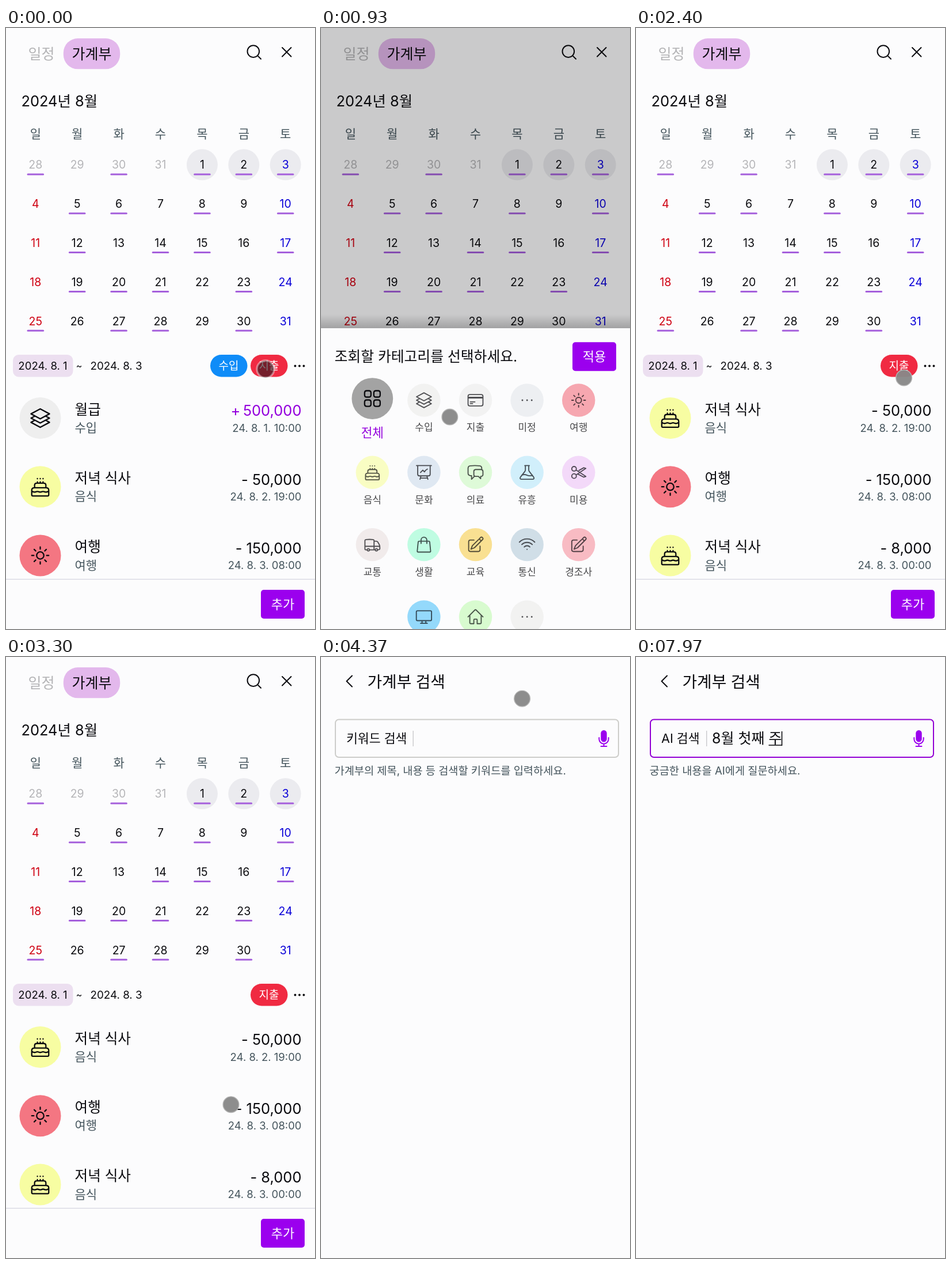
An HTML page for the animation above (8 s loop, 537x1043 px).

```html
<!DOCTYPE html>
<html lang="ko">
<head>
<meta charset="utf-8">
<title>가계부</title>
<style>
html, body { margin: 0; width: 100%; height: 100%; overflow: hidden; background: #fdfdfe; }
svg { display: block; width: 100vw; height: 100vh; }
text { font-family: Inter, "Noto Sans CJK KR", "Noto Sans CJK", "Noto Sans CJK JP", sans-serif; white-space: pre; }
.line { fill: none; stroke-linecap: round; stroke-linejoin: round; }
</style>
</head>
<body>
<svg id="stage" viewBox="0 0 537 1043"></svg>
<script>
const LOOP = 8000;
const PURPLE = '#9b00ee', INK = '#0b0b0f', SLATE = '#44545c', PAPER = '#fcfcfd';

// Icons on a 24-unit grid
const ICONS = {
  grid: 'M6 3.8H8.2Q10.5 3.8 10.5 6V8.2Q10.5 10.5 8.2 10.5H6Q3.8 10.5 3.8 8.2V6Q3.8 3.8 6 3.8ZM15.8 3.8H18Q20.2 3.8 20.2 6V8.2Q20.2 10.5 18 10.5H15.8Q13.5 10.5 13.5 8.2V6Q13.5 3.8 15.8 3.8ZM6 13.5H8.2Q10.5 13.5 10.5 15.8V18Q10.5 20.2 8.2 20.2H6Q3.8 20.2 3.8 18V15.8Q3.8 13.5 6 13.5ZM15.8 13.5H18Q20.2 13.5 20.2 15.8V18Q20.2 20.2 18 20.2H15.8Q13.5 20.2 13.5 18V15.8Q13.5 13.5 15.8 13.5Z',
  layers: 'M12 2.2L21.8 7.5 12 12.8 2.2 7.5ZM6.4 9.8L2.2 12 12 17.2 21.8 12 17.6 9.8M6.4 14.2L2.2 16.5 12 21.8 21.8 16.5 17.6 14.2',
  card: 'M4.5 4.5H19.5Q21.8 4.5 21.8 6.8V17.2Q21.8 19.5 19.5 19.5H4.5Q2.2 19.5 2.2 17.2V6.8Q2.2 4.5 4.5 4.5ZM2.2 8.2H21.8M2.2 9H21.8M5.2 14.2H11.2M5.2 16.5H8.2',
  dots: 'M5.8 12h.1M12 12h.1M18.1 12h.1',
  sun: 'M15.8 12a3.8 3.8 0 1 1-7.6 0 3.8 3.8 0 1 1 7.6 0M12 3v2.2M12 18.8V21M3 12H5.2M18.8 12H21M5.6 5.6L7.2 7.2M16.8 16.8L18.4 18.4M5.6 18.4L7.2 16.8M16.8 7.2L18.4 5.6',
  cake: 'M12 8.2V6.8M9 8.2V6.8M15 8.2V6.8M6 13V10.5Q6 8.2 8.3 8.2H15.7Q18 8.2 18 10.5V13M4.1 21.7H19.9Q21 21.7 21 20.6V15.5Q21 13 18 13H6Q3 13 3 15.5V20.6Q3 21.7 4.1 21.7M3 16.5l1.5.8q1.5.7 3 0t3 0 3 0 3 0 3 0l1.5-.8M9 3.3v.2M12 3.3v.2M15 3.3v.2',
  chart: 'M2.2 3H21.8M3.8 3V14.2Q3.8 16.5 6 16.5H18Q20.2 16.5 20.2 14.2V3M8.2 16.5L6.8 21M15.8 16.5L17.2 21M7.2 19.5H16.8M7.5 12l3-3 2.2 2.2Q14 8.8 16.5 7.6',
  chat: 'M20.2 8.3V6.6Q20.2 3.8 17.5 3.4 11.2 2.6 5 3.4 2.2 3.8 2.2 6.6V12.9Q2.2 15.7 5 16.1L6.8 16.3V21L10.9 16.8M18.8 17.2V20.2L15.8 17.2H11.7Q9.8 17 9.8 14.9V10.6Q9.8 8.4 12 8.2H19.5Q21.8 8.4 21.8 10.6V14.9Q21.8 17 18.8 17.2Z',
  flask: 'M9 3H15M9.8 3V8.5Q9.8 9.5 9.2 10.5L3.2 18.3Q2 21 5 21H19Q22 21 20.8 18.3L14.8 10.5Q14.2 9.5 14.2 8.5V3M5 15.6q3.5-1.6 7 0t7 0',
  scissors: 'M9 7.2a3 3 0 1 1-6 0 3 3 0 1 1 6 0M9 16.8a3 3 0 1 1-6 0 3 3 0 1 1 6 0M8.6 8.7L21.5 17.3 18.8 18.2 10.6 14M8.6 15.3L21.5 6.7 18.8 5.8 12.4 9.4',
  truck: 'M8.2 18.8a1.5 1.5 0 1 1-3 0 1.5 1.5 0 1 1 3 0M18.8 18.8a1.5 1.5 0 1 1-3 0 1.5 1.5 0 1 1 3 0M5.2 18.8H3.4Q2.2 18.8 2.2 17.6V6.6Q2.2 5.5 3.4 5.4 8.2 4.8 13 5.4 14.2 5.5 14.2 6.6V18.8M8.2 18.8H15.8M14.2 7.5H17Q18.5 7.5 19.2 8.7L21 11.8Q22 13.5 21.8 17.6 21.7 18.8 18.8 18.8M2.2 14.2H21.6',
  bag: 'M15.8 10.5V6a3.8 3.8 0 1 0-7.6 0v4.5M5.7 7.5H18.3Q19.4 7.5 19.6 8.5L20.8 20.5Q20.8 21.8 19.6 21.8H4.4Q3.2 21.8 3.2 20.5L4.4 8.5Q4.6 7.5 5.7 7.5Z',
  pencil: 'M16.9 4.5L18.5 2.8A1.9 1.9 0 0 1 21.2 5.5L10.6 16.1 6 18 7.9 13.4ZM16.9 4.5L19.5 7.1M18 14V18.8Q18 21 15.8 21H5.2Q3 21 3 18.8V8.2Q3 6 5.2 6H10',
  wifi: 'M8.3 15a5.2 5.2 0 0 1 7.4 0M5.1 11.9a9.8 9.8 0 0 1 13.8 0M1.9 8.7a14.2 14.2 0 0 1 20.2 0M12 18.2v.1',
  screen: 'M3.5 4H20.5Q22 4 22 5.5V15.5Q22 17 20.5 17H3.5Q2 17 2 15.5V5.5Q2 4 3.5 4ZM9.5 17V20.5M14.5 17V20.5M7.5 20.5H16.5',
  home: 'M2.2 12L11.2 3Q12 2.3 12.8 3L21.8 12M4.5 9.8V19.9Q4.5 21 5.6 21H9.8V16Q9.8 15 10.8 15H13.2Q14.2 15 14.2 16V21H18.4Q19.5 21 19.5 19.9V9.8'
};

const CATEGORIES = [
  ['전체', 'grid', '#a3a3a3'], ['수입', 'layers', '#ededea'], ['지출', 'card', '#ececec'],
  ['미정', 'dots', '#e5e8ec'], ['여행', 'sun', '#f27584'], ['음식', 'cake', '#f7fda2'],
  ['문화', 'chart', '#cfdcec'], ['의료', 'chat', '#cdf9c3'], ['유흥', 'flask', '#b8e8fb'],
  ['미용', 'scissors', '#eec4f7'], ['교통', 'truck', '#ebe1e1'], ['생활', 'bag', '#9cfcd3'],
  ['교육', 'pencil', '#f7d054'], ['통신', 'wifi', '#b7cddb'], ['경조사', 'pencil', '#f596a2'],
  ['가전', 'screen', '#58c4fa'], ['주거', 'home', '#c3fab5'], ['기타', 'dots', '#ededea']
];

const SALARY = ['월급', '수입', '+\u2009500,000', '24. 8. 1. 10:00', 'layers', '#eeeeee', '#9400dd'];
const DINNER = ['저녁 식사', '음식', '- 50,000', '24. 8. 2. 19:00', 'cake', '#f7fda2'];
const TRIP = ['여행', '여행', '- 150,000', '24. 8. 3. 08:00', 'sun', '#f47682'];
const SNACK = ['저녁 식사', '음식', '- 8,000', '24. 8. 3. 00:00', 'cake', '#f7fda2'];

// Small SVG builders; text is placed by its vertical centre
const text = (s, x, cy, size, fill = INK, anchor = 'start', extra = '') =>
  `<text x="${x}" y="${cy + size * 0.365}" font-size="${size}" fill="${fill}" text-anchor="${anchor}" ${extra}>${s}</text>`;
const rect = (x, y, w, h, fill, r = 0, extra = '') =>
  `<rect x="${x}" y="${y}" width="${w}" height="${h}" rx="${r}" fill="${fill}" ${extra}/>`;
const disc = (x, y, r, fill, extra = '') => `<circle cx="${x}" cy="${y}" r="${r}" fill="${fill}" ${extra}/>`;
const line = (d, width, stroke = INK, extra = '') =>
  `<path class="line" d="${d}" stroke="${stroke}" stroke-width="${width}" ${extra}/>`;
const icon = (name, x, y, k) =>
  line(ICONS[name], name === 'dots' ? 2.1 : 1.4, INK, `transform="translate(${x - 12 * k} ${y - 12 * k}) scale(${k})"`);
const button = (label, x, y) =>
  rect(x, y, 76, 50, PURPLE, 5) + text(label, x + 38, y + 25, 22, '#fff', 'middle', 'font-weight="500"');
const pill = (label, x, fill) =>
  rect(x, 567, 64.5, 38.5, fill, 19.2) + text(label, x + 32, 586, 19, '#fff', 'middle', 'font-weight="500"');

function calendar() {
  const marked = [0, 2, 4, 5, 6, 8, 9, 11, 13, 15, 17, 18, 20, 22, 23, 24, 26, 28, 30, 31, 33];
  let out = '';
  [...'일월화수목금토'].forEach((d, i) => { out += text(d, 51.3 + 72.4 * i, 183, 21, SLATE, 'middle'); });
  for (let i = 0; i < 35; i++) {
    const col = i % 7, x = 51.3 + 72.4 * col, y = 237.3 + 67.8 * Math.floor(i / 7);
    const day = i < 4 ? 28 + i : i - 3;
    const fill = i < 4 ? '#b5b5b8' : col === 0 ? '#cf0012' : col === 6 ? '#0a00d8' : INK;
    if (i > 3 && i < 7) out += disc(x, y, 27, '#ebebef');
    out += text(day, x, y, 19.5, fill, 'middle');
    if (marked.includes(i)) out += rect(x - 14.8, y + 15.2, 29.6, 3, '#a55fdc', 1.5);
  }
  return out;
}

const entry = ([title, kind, amount, date, ic, fill, ink = INK], i) => {
  const y = 677 + 119.2 * i;
  return disc(59.5, y, 36, fill) + icon(ic, 59.5, y, 1.64) +
    text(title, 119.5, y - 15, 24.6) + text(kind, 119.5, y + 16.5, 21, SLATE) +
    text(amount, 513.5, y - 13, 25.5, ink, 'end') + text(date, 513.5, y + 17, 18.5, SLATE, 'end');
};
const list = (rows, id) => `<g id="${id}">${rows.map(entry).join('')}</g>`;

const category = ([label, ic, fill], i) => {
  const n = i < 15 ? i : i + 1, x = 89.3 + 89.6 * (n % 5), y = 125 + 125.3 * Math.floor(n / 5);
  return `<g class="cat" data-x="${x}" data-y="${y + 12}">` +
    disc(x, y, 28.7, fill) + `<g>${icon(ic, x, y, 1.32)}</g>` +
    text(label, x, y + 47, 17, INK, 'middle') + '</g>';
};

const home = rect(0, 0, 537, 1043, PAPER) +
  text('일정', 38.5, 44.5, 25, '#b4b4b6') + rect(99.8, 18, 98.4, 53.3, '#e3b8ec', 25) +
  text('가계부', 149, 44.5, 25, INK, 'middle', 'font-weight="500"') +
  `<circle class="line" cx="429.8" cy="40.6" r="10.3" stroke="${INK}" stroke-width="2"/>` +
  line('M437.3 48.1L443 53.8', 2) + line('M480 34L495.5 49.5M495.5 34L480 49.5', 2) +
  text('2024년 8월', 26.5, 126.5, 25.4) + calendar() +
  rect(12, 567, 104.5, 38.5, '#ecdff0', 10) + text('2024. 8. 1', 64, 586, 18.6, INK, 'middle') +
  text('~', 127, 586, 16, INK, 'middle') + text('2024. 8. 3', 146.5, 586, 18.8) +
  `<g id="income">${pill('수입', 355, '#0f8cf8')}</g>` + pill('지출', 425, '#f02a42') +
  [502.5, 510, 517.5].map(x => disc(x, 586.5, 1.9, INK)).join('') +
  list([SALARY, DINNER, TRIP], 'all') + list([DINNER, TRIP, SNACK], 'spent') +
  rect(0, 956, 537, 87, PAPER) + rect(0, 956, 537, 1.3, '#d6d6e2') + button('추가', 443, 975);

const sheet = rect(0, -24, 537, 24, 'url(#shade)') + rect(0, 0, 537, 1043, PAPER) +
  text('조회할 카테고리를 선택하세요.', 23.5, 49, 24.8) + button('적용', 437, 24.3) +
  CATEGORIES.map(category).join('');

const search = rect(0, 0, 537, 1043, PAPER) + line('M54 32.5L44.5 42 54 51.5', 2) +
  text('가계부 검색', 80.5, 43, 27.8, INK, 'start', 'font-weight="500"') +
  rect(25, 108.5, 492, 65.5, 'none', 6, 'id="field" stroke-width="2"') +
  text('', 44, 141.5, 21.6, INK, 'start', 'id="mode"') +
  rect(0, 128, 1.4, 27, '#c9c9cc', 0, 'id="split"') +
  text('', 23.5, 197, 18.65, SLATE, 'start', 'id="hint"') +
  text('', 132, 141, 25, INK, 'start', 'id="query"') +
  rect(0, 152.3, 0, 1.5, INK, 0, 'id="compose"') + rect(0, 129, 1.6, 25, INK, 0, 'id="caret"') +
  rect(486.3, 127, 10.4, 20.5, PURPLE, 5.2) +
  line('M483.3 140V142.5A8.2 8.2 0 0 0 499.7 142.5V140M491.5 151V155M486.5 155H496.5', 2, PURPLE);

document.getElementById('stage').innerHTML =
  `<defs><linearGradient id="shade" x2="0" y2="1"><stop stop-color="#000" stop-opacity="0"/>
  <stop offset="1" stop-color="#000" stop-opacity=".2"/></linearGradient></defs>` +
  `<g>${home}</g>` + rect(0, 0, 537, 1043, '#000', 0, 'id="scrim"') +
  `<g id="sheet">${sheet}</g><g id="search">${search}</g><circle id="touch"/>`;

const $ = id => document.getElementById(id);
const set = (el, attrs) => { for (const k in attrs) el.setAttribute(k, attrs[k]); };
const show = (el, on) => { el.style.display = on ? '' : 'none'; };
const ramp = (t, from, to) => Math.min(1, Math.max(0, (t - from) / (to - from)));
const smooth = p => p * p * (3 - 2 * p);

// Touch path: time, x, y
const PATH = [
  [0, 451, 592], [150, 451, 592], [930, 224, 675], [1200, 268, 646], [1480, 268, 646],
  [1900, 473, 575], [2180, 473, 575], [3300, 391, 777], [3800, 431, 42], [4020, 431, 42],
  [4370, 350, 72], [4780, 97, 141], [5050, 97, 141], [5530, 204, 156], [5950, 157.5, 142],
  [6640, 157.5, 142], [7120, 270, 932]
];
const PRESSES = [[0, 130], [1220, 1420], [1960, 2140], [3830, 3990], [4820, 5020], [6360, 6630]];
const TYPING = [
  [7200, '8'], [7290, '8ㅇ'], [7350, '8우'], [7410, '8워'], [7490, '8월'], [7550, '8월 '],
  [7600, '8월 ㅊ'], [7650, '8월 처'], [7700, '8월 첫'], [7750, '8월 첫ㅉ'], [7800, '8월 첫째'],
  [7850, '8월 첫째 '], [7900, '8월 첫째 ㅈ'], [7950, '8월 첫째 주']
];

// Velocity at a path point, zero where the touch rests
function slope(i, axis) {
  const a = PATH[i - 1], b = PATH[i], c = PATH[i + 1];
  const same = p => p[1] === b[1] && p[2] === b[2];
  return !a || !c || same(a) || same(c) ? 0 : (c[axis] - a[axis]) / (c[0] - a[0]);
}
function pathAt(t, axis) {
  const n = PATH.findIndex(p => p[0] > t);
  if (n < 0) return PATH[PATH.length - 1][axis];
  const a = PATH[n - 1], b = PATH[n], d = b[0] - a[0], u = (t - a[0]) / d, v = 1 - u;
  return a[axis] * v * v * (1 + 2 * u) + b[axis] * u * u * (3 - 2 * u) +
    slope(n - 1, axis) * d * u * v * v - slope(n, axis) * d * u * u * v;
}

const cats = [...document.querySelectorAll('.cat')];
function drawSheet(t) {
  const gone = t < 1500 ? 1 - ramp(t, 190, 490) : ramp(t, 2065, 2365);
  show($('sheet'), gone < 1);
  set($('sheet'), { transform: `translate(0 ${521 + 522 * Math.pow(gone, 2.1)})`, opacity: 1 - gone });
  set($('scrim'), { opacity: 0.2 * (1 - gone) });
  const swap = smooth(ramp(t, 1400, 1580));
  cats.forEach((g, i) => {
    const on = i === 0 ? 1 - swap : i === 2 ? swap : 0, { x, y } = g.dataset;
    set(g, { transform: `translate(${x} ${y}) scale(${1 + 0.25 * on}) translate(${-x} ${-y})` });
    const [circle, mark, label] = g.children;
    set(circle, { opacity: 0.63 + 0.37 * on });
    set(mark, { opacity: 0.7 + 0.3 * on });
    set(label, { fill: on > 0.5 ? '#9400dd' : '#48484a' });
  });
}

function drawSearch(t) {
  const ai = t >= 5020, focus = t >= 6640;
  set($('search'), { opacity: smooth(ramp(t, 3960, 4220)) });
  show($('search'), t > 3960);
  set($('field'), { stroke: focus ? '#9200d4' : '#cdcdca' });
  $('mode').textContent = ai ? 'AI 검색' : '키워드 검색';
  $('hint').textContent = ai ? '궁금한 내용을 AI에게 질문하세요.' : '가계부의 제목, 내용 등 검색할 키워드를 입력하세요.';
  set($('split'), { x: ai ? 122 : 159.5 });
  const typed = TYPING.reduce((s, [at, v]) => t >= at ? v : s, '');
  $('query').textContent = typed;
  const end = 132 + (typed ? $('query').getComputedTextLength() : 0);
  const composing = /[가-힣ㄱ-ㅎ]$/.test(typed);
  set($('caret'), { x: end - 0.8 });
  set($('compose'), { x: end - 23, width: composing ? 23 : 0 });
  show($('caret'), focus);
}

function drawTouch(t) {
  const down = PRESSES.some(([a, b]) => t >= a && t < b);
  show($('touch'), t < 7150);
  set($('touch'), {
    cx: pathAt(t, 1), cy: pathAt(t, 2), r: down ? 15 : 13.8,
    fill: down ? 'rgba(35,25,30,.6)' : 'rgba(136,136,136,.96)',
    stroke: down ? 'rgba(255,255,255,.4)' : '#b4b4b4', 'stroke-width': down ? 3.4 : 1.4
  });
}

function draw(t) {
  const filtered = t >= 2050;
  show($('income'), !filtered);
  show($('all'), !filtered);
  show($('spent'), filtered);
  drawSheet(t);
  drawSearch(t);
  drawTouch(t);
}

const start = performance.now();
function tick() {
  draw((performance.now() - start) % LOOP);
  requestAnimationFrame(tick);
}
tick();
</script>
</body>
</html>
```
